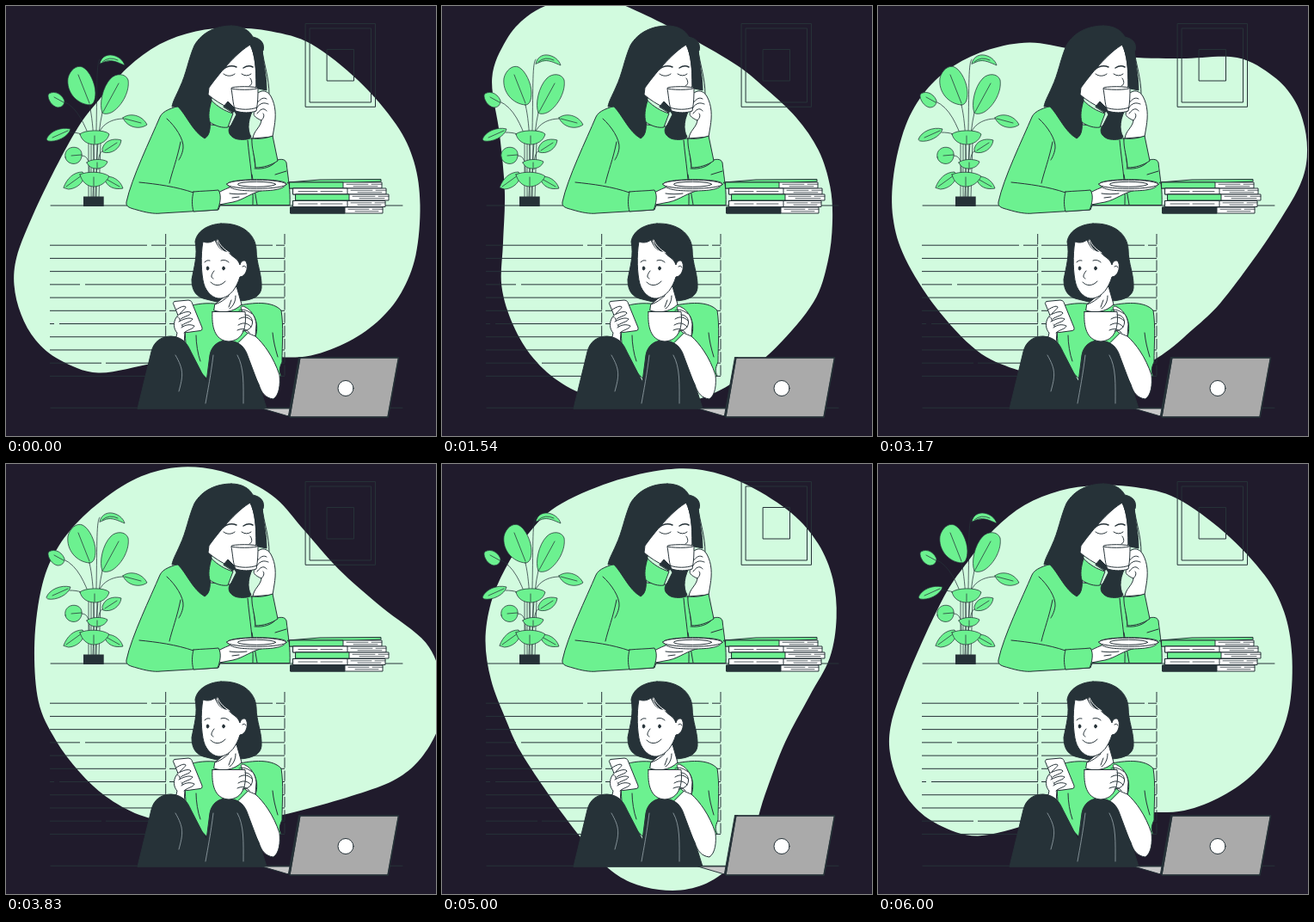
An HTML page for the animation above (6.04 s loop, 500 by 500 pixels).

```html
<!DOCTYPE html>
<html lang="en">
<head>
<meta charset="utf-8">
<title>Coffee break</title>
<style>
  html, body { margin: 0; width: 100%; height: 100%; overflow: hidden; background: #201b2c; }
  svg { display: block; width: 100vw; height: 100vh; }
  .ink { stroke: #263238; stroke-width: 1; stroke-linecap: round; stroke-linejoin: round; }
  .thin { stroke-width: .75; }
  .line { fill: none; }
  .green { fill: #6cf190; }
  .white { fill: #fff; }
  .dark { fill: #263238; }
</style>
</head>
<body>
<svg viewBox="0 0 500 500">
  <path id="blob" fill="#d2fbdf"/>

  <g class="ink line">
    <path d="M52 232H461M52 467.3H461"/>
    <path d="M348.5 20.5H429.5V117.3H348.5ZM353.5 26H424.5V112H353.5ZM373.5 50.5H404.5V87H373.5Z"/>
    <path id="slats" stroke-linecap="butt"/>
    <path d="M185.7 265V432M324 265V432" stroke-dasharray="12.2 3.05" stroke-linecap="butt"/>
  </g>

  <!-- plant -->
  <g class="ink line thin">
    <path d="M97 115C103 140 103 180 101 222M112 124C106 150 105 190 104 222M109 62C105 66 106 90 105 145M67 111C84 118 92 140 98 155M74 147C84 147 92 149 98 156M137 131C120 131 108 140 106 155"/>
    <path d="M96 158V222M99 158V222M102 158V222M106 158L105 222M110 158L108 222M88 174C96 174 97 182 97 195M113 168C108 170 107 178 107 190"/>
  </g>
  <g class="ink green thin" id="leaves"></g>
  <path class="dark" d="M90 221.5H113.7V233H90Z"/>

  <!-- upper woman -->
  <g class="ink">
    <path class="green" d="M206 115C193 118 182 122 179 129C168 155 146 200 140 228C139 234 145 235 152 237C162 240 172 242 180 241L247 237L249 231.5H330C331 215 328 200 326 182C324 177 318 178 312 180L290 188L286 154H281L260 140L238 138Z"/>
    <path class="line" d="M187 131C197 140 207 155 206 165C205 173 202 177 201 179M203 158C199 178 193 193 190 206M281 156C283 180 288 205 287 231M155 205C175 207 198 210 218 217M289 189C300 190 309 187 315 180M313 196L326 192M286 196L292 231"/>
    <path class="dark" d="M262 23C245 23 228 30 219 46C212 62 210 78 202 95C198 104 194 111 193 117L200 117C210 127 217 146 231 154C238 150 238 140 237 124L240 100L258 112L268 126L262 138C255 146 262 154 270 155C277 156 284 155 285 152C280 144 281 130 290 116L292 60L288 50L299 52C301 44 297 38 287 36C283 28 274 23 262 23Z"/>
    <path class="green" d="M239 110C236 120 235 128 237 135C244 140 252 142 258 141L264 125C254 122 246 117 239 110Z"/>
    <path class="white" d="M284 45C270 53 252 73 236 95L235 103C243 110 250 114 258 118C268 119 280 118 287 110L291 92C291 74 290 57 284 45Z"/>
    <path class="dark" d="M253 117L258 111L266 119L264 124Z"/>
    <path class="dark" d="M284 45L298 51C299 66 303 80 303 98L293 96L291 92C291 74 290 57 284 45Z"/>
    <path class="line" d="M298 52C300 68 306 84 306 103"/>
    <path class="line" d="M253 79C257 82 262 82 266 79M274 79Q280 83 285 79M284 84C287 88 286 92 283 93"/>
    <path class="line" d="M252 74C258 69 263 69 268 71M276 72Q282 68 287 71" style="stroke-width:1.5"/>
    <path class="white" d="M290 111L292 102C297 97 304 98 308 105C314 116 314 128 312 140L310 152L287 154C288 145 296 141 297 133C290 130 285 126 290 122Z"/>
    <path class="line" d="M292 113C296 107 300 106 303 108M291 119C296 112 300 112 305 114M292 125C297 118 301 119 303 122M297 133C301 129 300 126 299 125"/>
    <path class="white" d="M262 96C264 108 264 116 267 122C275 124.5 284 124.5 291 122C293 112 293 104 293 95Z"/>
    <ellipse class="white" cx="277.5" cy="95.5" rx="15.5" ry="1.8"/>
    <path class="line" d="M265 118C273 121 284 121 292 118"/>
    <path class="green" d="M286 154C294 155 302 154 310 151L316 180C309 185 299 188 290 188C290 176 285 165 286 154Z"/>
    <path class="white" d="M247 217C258 211 270 206 285 208L300 214C285 217 277 225 264 228L248 231Z"/>
    <path class="green" d="M218 216C228 215 238 215 247 214C251 220 249 230 246 237L218 239C216 232 216 224 218 216Z"/>
    <path class="white" d="M257 207C257 200 326 200 326 207C323 213 312 215 291 215C270 215 260 213 257 207Z"/>
    <ellipse class="white" cx="291.5" cy="207.3" rx="34.5" ry="5"/>
    <ellipse class="white" cx="291.5" cy="207.3" rx="22" ry="3"/>
    <path class="line" d="M260 218C267 219 273 219 280 218M263 223L271 222"/>
  </g>

  <g class="ink" id="books">
    <path class="green" d="M328 205L365 202L436 201.5V204L392 206H328Z"/>
  </g>

  <!-- lower woman -->
  <g class="ink">
    <path class="green" d="M242 346C230 345 216 347 210 351C207 365 208 390 211 410L240 440H300L320 430C318 426 317 422 321 414C321 394 323 372 320 354C311 344 292 344 272 348Z"/>
    <path class="line" d="M290 384C293 378 292 366 288 360M316 408C313 398 311 390 310 380M221 383C221 392 223 405 226 413"/>
    <path class="dark" d="M250 253C234 254 222 262 220 274C223 290 219 302 216 318C216 332 222 339 233 341L245 344L272 343C286 342 296 338 297 328C298 312 291 300 291 283C290 265 274 252 250 253Z"/>
    <path class="white" d="M243 347L268 326L274 347C264 357 250 357 242 354Z"/>
    <path class="white" d="M229 274C226 290 227 312 230 323C233 333 241 341 250 340C261 338 268 328 272 315C280 315 283 300 278 296C274 296 273 298 272 301C269 292 263 293 258 285C251 286 247 281 243 272C239 275 234 276 229 274Z"/>
    <path class="line" d="M245 273C247 280 251 285 258 288M246 272C249 279 254 283 260 287" style="stroke:#fff"/>
    <path class="line" d="M231 298Q233 295 237 296M250 296Q255 294 259 298M242 308C238 313 238 316 241 317M238 321C242 326 250 326 255 320M275 303Q278 301 279 304M267 337C267 344 264 349 260 352M262 342L259 350M243 347C250 345 254 341 259 337"/>
    <ellipse class="dark" cx="234.5" cy="305" rx="1.3" ry="2"/>
    <ellipse class="dark" cx="253" cy="305" rx="1.3" ry="2"/>
    <path class="white" d="M284 378L290 384C300 393 311 408 318 429C319 440 318 452 311 457C302 456 297 450 294 440L270 392Z"/>
    <path class="white" d="M198 362C194 368 195 376 199 380L196 394H207L208 379L221 375L216 358Z"/>
    <path class="white" d="M196 343.5L212 342Q215 342 216 344.5L228 374Q229 377 226 377.5L211 379.5Q208 380 207 377L194.5 346Z"/>
    <path class="white" d="M198 353C203 350 207 348 209 350C209 352 204 355 202 358M199 360C206 356 213 354 215 357C214 360 207 361 203 364M201 367C208 363 214 362 217 364C216 367 209 368 205 371M204 374C209 370 215 370 219 372C218 376 211 376 207 380"/>
    <path class="dark" d="M153 468L169 402C172 389 182 384 192 384C206 385 211 393 215 402L233 437L237 406C239 394 248 389 256 389C268 389 276 394 280 404L298 452L303 468Z"/>
    <path class="line" d="M197 406C207 423 206 430 201 448M241 406C238 430 235 445 232 462M269 406C277 420 276 440 276 462" style="stroke:#9aa8ae;stroke-width:.8"/>
    <path class="white" d="M274 353C272 350 274 348 278 350C284 353 290 360 291 370L290 384C283 381 279 380 277 377Z"/>
    <path class="white" d="M240 355.5H278C280 373 276 389 259 390C242 389 239 372 240 355.5Z"/>
    <path class="line" d="M278 359C290 359 290 378 275 378M271 354C276 352 281 354 286 358M271 364C277 360 282 362 286 366M270 371C277 367 281 369 285 373M269 377C275 374 280 376 283 380"/>
  </g>

  <!-- laptop -->
  <g class="ink">
    <path d="M298 468H331V476.5H327Z" fill="#c8c8c8"/>
    <path class="dark" d="M340.5 409L328.5 476L330.5 478H333L344 409Z"/>
    <path d="M342.5 409H456.5L444 478H330.5Z" fill="#aaa"/>
    <path class="line" d="M340.5 409H456.5L444 478H330.5" style="stroke-width:1.5"/>
    <circle class="white" cx="395" cy="444.5" r="9"/>
  </g>
</svg>
<script>
const LOOP = 6040, STEP = 125 / 3, STEPS = 145, CENTRE = [248.5, 231.5];
const $ = id => document.getElementById(id);

function add(parent, d, cls) {
  const p = document.createElementNS("http://www.w3.org/2000/svg", "path");
  p.setAttribute("d", d);
  if (cls) p.setAttribute("class", cls);
  parent.append(p);
}

// closed smooth curve through points
function smooth(pts) {
  const n = pts.length, at = i => pts[(i + n) % n];
  let d = "M" + pts[0];
  pts.forEach((p, i) => {
    const q = at(i + 1), a = at(i - 1), b = at(i + 2);
    const c1 = p.map((v, j) => v + (q[j] - a[j]) / 6);
    const c2 = q.map((v, j) => v - (b[j] - p[j]) / 6);
    d += `C${c1} ${c2} ${q}`;
  });
  return d + "Z";
}

$("blob").setAttribute("d", smooth([
  [233, 0], [226, -50], [205, -94], [161, -145], [107, -187], [60, -202], [14, -206],
  [-28, -202], [-70, -187], [-107, -160], [-139, -124], [-165, -90], [-195, -35],
  [-220, 18], [-236, 60], [-239, 93], [-231, 127], [-214, 157], [-186, 180],
  [-141, 195], [-76, 184], [-10, 176], [50, 176], [100, 176], [145, 161],
  [183, 136], [211, 102], [228, 58]
]));

// window slats: two panes with a gap here and there
const gaps = { 0: [164, 169], 3: [86, 92], 6: [56, 62], 9: [111, 116] };
let slats = "";
for (let i = 0; i < 11; i++) {
  const y = 278.2 + i * 15.22, g = gaps[i];
  slats += g ? `M51 ${y}H${g[0]}M${g[1]} ${y}H186` : `M51 ${y}H186`;
  slats += i ? `M190 ${y}H324` : `M190 ${y}H310M314 ${y}H324`;
}
$("slats").setAttribute("d", slats);

[
  "M97 115C82 114 70 100 72 84C74 75 82 68 89 71C97 75 104 90 104 101C104 109 102 115 97 115ZM84 80L97 113",
  "M112 124C108 115 112 94 122 84C128 78 139 78 142 86C144 98 136 115 124 123C119 126 113 126 112 124ZM131 90L113 123",
  "M109 67C111 58 119 55 127 58C133 60 137 65 138 69C131 66 123 62 117 64ZM112 65Q120 58 130 63",
  "M49 103C53 98 64 100 68 110C68 115 65 118 60 118C54 117 48 109 49 103ZM56 106L67 112",
  "M47 155C50 146 64 140 75 143C73 152 58 159 49 157ZM54 153L72 145",
  "M136 130C143 124 158 126 164 138C156 144 141 142 136 130ZM138 131L157 136",
  "M86 149C90 144 115 143 120 149C118 157 110 161 103 161C95 161 88 157 86 149ZM103 151V160",
  "M112 166C114 157 124 153 134 156C133 166 122 173 113 170ZM115 168L129 159",
  "M69 176C67 168 75 162 83 165C90 168 89 177 85 181C80 186 70 183 69 176ZM76 174L88 173",
  "M67 211C71 200 79 193 89 193C94 200 86 212 73 213ZM70 210L88 197",
  "M114 199C122 196 133 202 136 212C127 214 116 211 114 199ZM116 201L132 210",
  "M94 182C97 178 112 177 118 181C116 187 110 189 105 189C100 189 96 187 94 182ZM106 182V188",
  "M86 196C94 192 112 192 120 198C116 206 109 210 102 210C94 210 88 204 86 196ZM102 199V209"
].forEach(d => add($("leaves"), d));

// books: left, spine end, right, top, cover
[
  [330, 392, 437, 205, "green"],
  [334, 397, 442, 212, "white"],
  [337, 399, 445, 219, "green"],
  [334, 397, 441, 226.5, "white"],
  [331, 394, 438, 234, "dark"]
].forEach(([l, m, r, y, cls]) => {
  const h = 7;
  add($("books"), `M${l} ${y}H${r}V${y + h}H${l}Z`, "white");
  add($("books"), `M${l} ${y}H${m}V${y + h}H${l}Z`, cls);
  add($("books"), `M${m + 4} ${y + 2.3}H${r - 16}M${r - 12} ${y + 2.3}H${r}M${m + 12} ${y + 4.7}H${r - 5}`, "line thin");
  if (cls === "white") add($("books"), `M${l + 6} ${y + 3.5}H${l + 28}M${l + 32} ${y + 3.5}H${m - 6}`, "line thin");
});

function draw(now) {
  const k = Math.floor(((now % LOOP) + 5) / STEP) % STEPS;
  $("blob").setAttribute("transform", `translate(${CENTRE}) rotate(${360 * k / STEPS})`);
  requestAnimationFrame(draw);
}
draw(performance.now());
</script>
</body>
</html>
```
